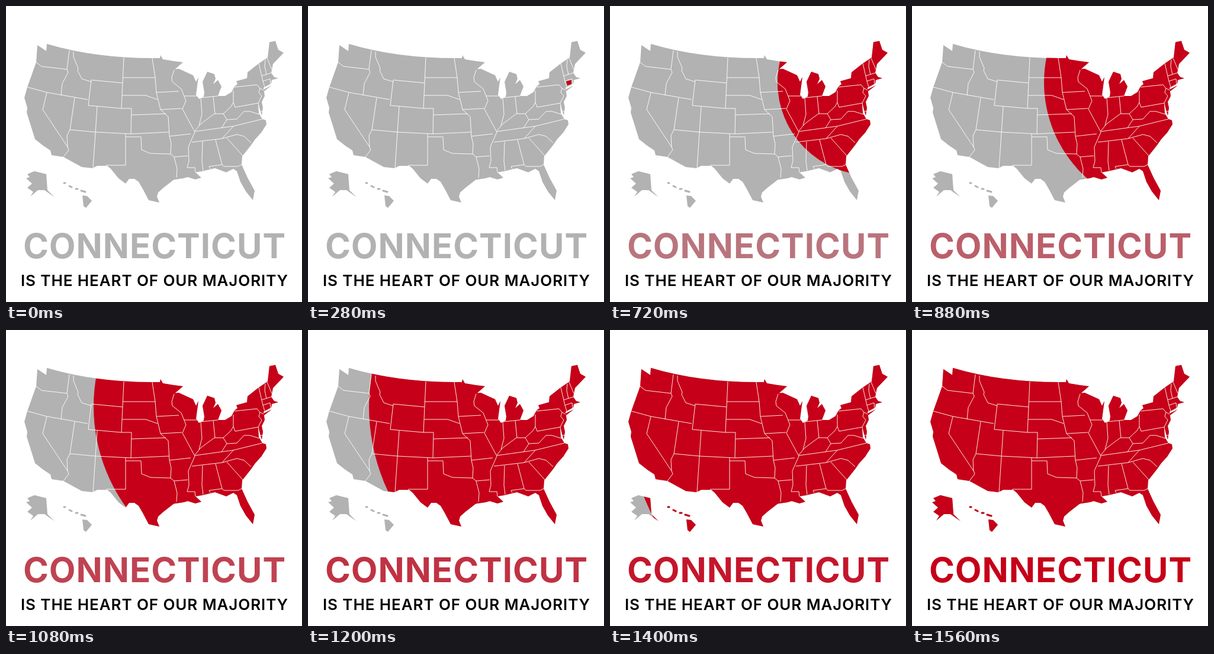
An HTML page that plays this animation: 500x500 px, repeating every 2000 ms.

```html
<!DOCTYPE html>
<html lang="en">
<head>
<meta charset="utf-8">
<title>Connecticut</title>
<style>
  html, body { margin: 0; width: 100%; height: 100%; overflow: hidden; background: #fff; }
  svg { display: block; width: 100vw; height: 100vh; }
  text { font-family: Inter, sans-serif; text-anchor: middle; }
  #name { font-size: 58px; font-weight: 700; letter-spacing: 1px; }
  #line { font-size: 26px; font-weight: 600; letter-spacing: .9px; }
  #land { fill: currentColor; }
  #borders { fill: none; stroke: #fff; stroke-width: .9px; stroke-linejoin: round; }
  #isles { stroke: currentColor; stroke-width: 3px; stroke-linecap: round; }
  .base { color: #b2b2b2; }
  .glow { color: #c60018; }
</style>
</head>
<body>
<svg viewBox="0 0 500 500">
  <defs>
    <!-- overlapping regions that join into one silhouette -->
    <g id="land">
      <path class="west" d="M53 66L68 76 69 64Q150 88 248 88H260L261 83 265 90 283 93 299 95 284 108V293L266 307 257 315 255 322 259 332 241 328 231 309 224 297 217 292H208L202 300 190 291 177 275 171 270H154L146 274 128 272 97 255 77 252 75 244 63 236 49 225 35 180 36 172 31 155 36 137 51 95Z"/>
      <path class="lakes" d="M270 108L292 106 316 117 321 128 325 120 321 150 326 157 334 153 335 146 332 128 340 111 352 115 354 123 350 132 358 125 364 136 358 152 370 152 390 140V200H270Z"/>
      <path class="northeast" d="M380 147L386 136 391 132 389 127 407 122 408 112 427 97 442 87 445 61 455 59 460 74 469 79 451 98 448 113 453 120 460 122 449 125 448 131 435 138 437 152 432 162 434 172 432 185 426 166 427 181 433 191 439 193 440 200 431 214H380Z"/>
      <path class="south" d="M270 195H438L431 214 421 225 414 235 399 254 398 268 408 290 420 312 417 328 405 313 396 297 390 279 384 275 372 281 353 274 332 279 320 281 330 290 320 293 307 289 300 291 280 294Z"/>
      <path class="long-island" d="M435 141L449 134 436 144Z"/>
      <path class="alaska" d="M48 279L68 284 70 311 82 323 65 311 54 311 41 322 46 314 36 307 44 300 34 291 40 289 36 284Z"/>
      <path class="hawaii" d="M129 320L137 321 145 329 135 341 131 338Z"/>
      <path id="isles" d="M98 299h2M107 304l4 2M118 309h3M127 312l7 2"/>
    </g>
    <clipPath id="spread"><circle id="disc" cx="440" cy="129"/></clipPath>
  </defs>
  <use href="#land" class="base"/>
  <use href="#land" class="glow" clip-path="url(#spread)"/>
  <path id="home" fill="#c60018" d="M436 127L445 125V132L438 134Z"/>
  <g id="borders">
    <path class="pacific" d="M51 95L60 102 103 107M36 137L69 146 138 158M69 146L62 175 104 238 106 243 97 255M116 155L108 209 103 219 104 238M107 75L103 107 105 112 95 131 93 151M114 77V86L122 105 121 109 128 123 144 128"/>
    <path class="mountain" d="M144 125L197 130 195 173 139 168ZM154 170L147 274M108 209L151 213 211 216 275 213M202 216V269H169"/>
    <path class="plains" d="M199 87L197 130M197 121H252M247 88L252 121 254 146 261 175 274 187 276 220 279 233 278 250M196 151H236L256 158M195 173H212L211 216M212 184L270 182M254 146L292 144M261 175L297 173"/>
    <path class="gulf" d="M202 221H228L229 243 244 249 278 250 284 255 307 253M284 255L289 275 288 290M276 220L312 216"/>
    <path class="midwest" d="M284 108L280 121 281 128 296 140 304 160 298 174 319 213 308 238 309 262 306 273H319L320 281M301 152H322M329 155L331 183 326 202M329 155L358 152M350 153L353 182M319 211L329 199 352 182H367L380 170 384 163V143"/>
    <path class="dixie" d="M319 212L384 203 433 191M314 230L365 224 390 217 402 220 414 231M365 224L384 203M332 229L331 262 333 278M354 226L365 268 343 271 345 275M365 268L368 271H392L398 268M373 223L400 253M367 182L373 192 364 206M373 192L390 191 402 178H412L428 183"/>
    <path class="atlantic" d="M384 163L387 171 426 164 429 178H434M386 137L424 133 429 139 427 146 432 152 426 164M429 139L435 142"/>
    <path class="england" d="M427 97L434 127 437 137M438 91L437 102 440 116M441 88L449 107M432 118L448 113M434 127L446 123 447 132"/>
  </g>
  <text id="name" x="251" y="426">CONNECTICUT</text>
  <text id="line" x="251" y="473">IS THE HEART OF OUR MAJORITY</text>
</svg>
<script>
const el = id => document.getElementById(id);
const STEP = 40, LAST = 39, START = 7, LOOP = 2000;
const clamp = v => Math.min(1, Math.max(0, v));
const gray = [178, 178, 178], red = [198, 0, 24];

function draw(ms) {
  const k = Math.min(LAST, Math.floor(ms % LOOP / STEP));
  const p = clamp((k - START) / (LAST - START));
  el('home').setAttribute('opacity', clamp(k / START));
  el('disc').setAttribute('r', Math.max(0, 15 * (k - START) - 8));
  const mix = gray.map((g, i) => Math.round(g + (red[i] - g) * p));
  el('name').setAttribute('fill', `rgb(${mix})`);
}

function tick() {
  draw(performance.now());
  requestAnimationFrame(tick);
}
tick();
</script>
</body>
</html>
```
